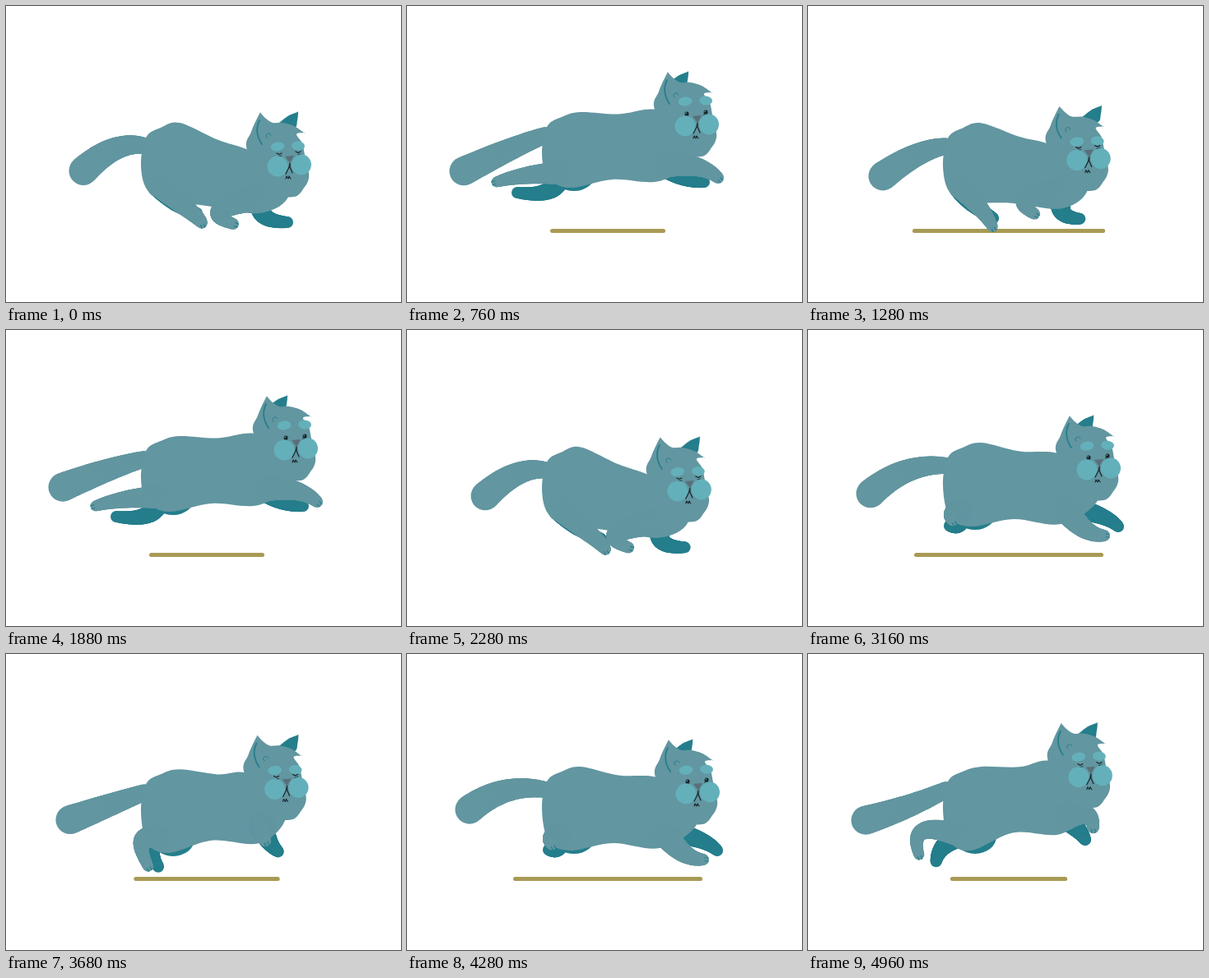
Recreate the animation shown at these times as an HTML page with a canvas. Size 480 by 360 pixels, loop 5 s.

```html
<!DOCTYPE html>
<html lang="en">
<head>
<meta charset="utf-8">
<title>Running cat</title>
<style>
html, body { margin: 0; width: 100%; height: 100%; overflow: hidden; background: #fff; }
canvas { display: block; }
</style>
</head>
<body>
<canvas id="stage" width="480" height="360"></canvas>
<script>
const ctx = document.getElementById('stage').getContext('2d');
const LOOP = 5000, STRIDE = 1120, STEP = 40;
const FUR = '#6296a0', DARK = '#257e8c', PALE = '#64b0ba', SAND = '#a89a55', INK = '#17262c';

// The four key poses of a stride: gathered, lift-off, stretched, landing.
// Tail is bend and end; each leg is knee and toe; belly is its height at haunch, waist and elbow.
const poses = [
  { at: 0, head: [330, 195], turn: [0], hump: [142], belly: [236, 244, 252], tail: [133, 167, 94, 209],
    hind: [236, 258, 238, 264], farHind: [210, 246, 232, 252], fore: [228, 248, 276, 265], farFore: [300, 262, 342, 263], shade: [131] },
  { at: 440, head: [328, 152], turn: [0], hump: [138], belly: [241, 219, 221], tail: [125, 188, 71, 205],
    hind: [122, 200, 142, 248], farHind: [158, 232, 161, 255], fore: [340, 188, 341, 214], farFore: [330, 216, 335, 229], shade: [74] },
  { at: 760, head: [338, 146], turn: [1], hump: [129], belly: [221, 211, 213], tail: [125, 173, 69, 201],
    hind: [140, 204, 109, 214], farHind: [185, 234, 134, 227], fore: [358, 190, 378, 209], farFore: [335, 212, 361, 214], shade: [70] },
  { at: 920, head: [339, 170], turn: [0.8], hump: [137], belly: [239, 230, 236], tail: [118, 161, 76, 199],
    hind: [170, 222, 176, 232], farHind: [187, 242, 172, 238], fore: [335, 250, 360, 250], farFore: [360, 222, 377, 239], shade: [115] }
];

const keyAt = i => {
  const n = poses.length, lap = Math.floor(i / n), pose = poses[i - lap * n];
  return { pose, t: pose.at + lap * STRIDE };
};

// Cubic through the keys, with tangents taken from a parabola of three neighbours.
function poseAt(phase) {
  let i = poses.length - 1;
  while (poses[i].at > phase) i--;
  const k = [i - 1, i, i + 1, i + 2].map(keyAt);
  const [ha, h, hb] = [0, 1, 2].map(j => k[j + 1].t - k[j].t);
  const u = (phase - k[1].t) / h, u2 = u * u, u3 = u2 * u;
  const mix = (a, b, c, d) => {
    const s0 = (b - a) / ha, s1 = (c - b) / h, s2 = (d - c) / hb;
    const m0 = (s0 * h + s1 * ha) / (ha + h), m1 = (s1 * hb + s2 * h) / (h + hb);
    return b + (c - b) * (3 * u2 - 2 * u3) + h * (m0 * (u3 - 2 * u2 + u) + m1 * (u3 - u2));
  };
  const out = {};
  for (const part in poses[0]) {
    if (part === 'at') continue;
    const [a, b, c, d] = k.map(e => e.pose[part]);
    out[part] = b.map((v, j) => mix(a[j], v, c[j], d[j]));
  }
  return out;
}

// Smooth closed shape through x,y pairs.
function blob(p, color) {
  const n = p.length / 2, at = i => [p[(i + n) % n * 2], p[(i + n) % n * 2 + 1]];
  ctx.beginPath();
  ctx.moveTo(p[0], p[1]);
  for (let i = 0; i < n; i++) {
    const [a, b, c, d] = [at(i - 1), at(i), at(i + 1), at(i + 2)];
    ctx.bezierCurveTo(b[0] + (c[0] - a[0]) / 6, b[1] + (c[1] - a[1]) / 6,
      c[0] - (d[0] - b[0]) / 6, c[1] - (d[1] - b[1]) / 6, c[0], c[1]);
  }
  ctx.fillStyle = color;
  ctx.fill();
}

function oval(x, y, rx, ry, color, tilt = 0) {
  ctx.beginPath();
  ctx.ellipse(x, y, rx, ry, tilt, 0, 7);
  ctx.fillStyle = color;
  ctx.fill();
}

function line(p, color, width) {
  ctx.beginPath();
  for (let i = 0; i < p.length; i += 2) ctx.lineTo(p[i], p[i + 1]);
  ctx.strokeStyle = color;
  ctx.lineWidth = width;
  ctx.stroke();
}

// Curved limb whose radius runs from r0 at the joint to r1 at the end.
function limb([x, y], [bx, by, ex, ey], r0, r1, color) {
  for (let i = 0; i <= 60; i++) {
    const t = i / 60, s = 1 - t, r = r0 + (r1 - r0) * t;
    oval(s * s * x + 2 * s * t * bx + t * t * ex, s * s * y + 2 * s * t * by + t * t * ey, r, r, color);
  }
}

function toes([bx, by, ex, ey]) {
  const a = Math.atan2(ey - by, ex - bx), c = Math.cos(a), s = Math.sin(a);
  for (const side of [-2, 2]) {
    line([ex + c * 6 - s * side, ey + s * 6 + c * side, ex + c * 2 - s * side, ey + s * 2 + c * side], DARK, 1.2);
  }
}

function eye(x, y, open) {
  if (open) {
    oval(x, y, 2.5, 2.5, INK);
    oval(x - 0.8, y - 0.8, 0.8, 0.8, PALE);
    line([x - 3, y + 3, x + 2, y + 3], INK, 0.8);
  } else {
    line([x - 3, y - 1, x, y + 0.5, x + 3, y - 1], INK, 1.3);
    line([x - 1, y + 3, x + 3, y + 2], INK, 0.8);
  }
}

// Everything here is measured from the centre of the left cheek.
function head(turn) {
  blob([-37,-20, -32,-42, -22,-64, -20,-64, -14,-58, -6,-53, 6,-53, 20,-49, 32,-41, 32,-41, 23,-39,
    30,-28, 33,-14, 37,3, 38,14, 33,25, 20,37, -10,30], FUR);

  ctx.strokeStyle = DARK;
  ctx.lineWidth = 1.8;
  ctx.beginPath();
  ctx.moveTo(-22, -56);
  ctx.quadraticCurveTo(-29, -42, -19, -27);
  ctx.stroke();
  ctx.lineWidth = 1;
  ctx.beginPath();
  ctx.arc(-11, -37, 3, 2.2, 6);
  ctx.stroke();

  const browY = -24 - 6 * turn, open = turn > 0.5;
  oval(0, browY, 8.5, 5.5, PALE, -0.15);
  oval(25, browY - 1, 8, 5.5, PALE, 0.08);
  eye(2, -15, open);
  eye(25, -17, open);
  oval(0, 0, 12.5, 12.5, PALE);
  oval(29, -2, 12, 12.5, PALE);

  ctx.beginPath();
  ctx.moveTo(9, -12);
  ctx.lineTo(20, -13);
  ctx.lineTo(15, -4);
  ctx.fillStyle = '#596f79';
  ctx.fill();
  line([10, 9, 14, 1, 15, -4, 15, 1, 18, 8], INK, 1.2);
  line([10, 15, 11, 12, 13, 15, 14, 12, 16, 15], INK, 1.1);
}

function draw(t) {
  const phase = t % STRIDE, p = poseAt(phase);
  const [hx, hy] = p.head, [hump] = p.hump, [turn] = p.turn, [half] = p.shade;
  const [haunch, waist, elbow] = p.belly;
  const hip = [185, haunch - 18], shoulder = [312, elbow - 20];

  // The tail swings at half the rate of the stride.
  const sway = -5 * (1 - Math.cos(Math.PI * (t - 840) / STRIDE));
  const tail = p.tail.map((v, i) => v + [0, sway / 2, 0, sway][i]);

  ctx.fillStyle = '#fff';
  ctx.fillRect(0, 0, 480, 360);
  ctx.lineCap = ctx.lineJoin = 'round';
  if (half < 125) line([246.5 - half, 273.5, 241.5 + half, 273.5], SAND, 5);

  const ex = hx + 25 - 21 * turn, ey = hy - 66;
  blob([ex - 27, ey + 19, ex - 14, ey + 6, ex - 1, ey, ex, ey, ex - 1, ey + 10, ex - 5, ey + 20], DARK);
  oval(203, haunch - 17, 26, 21, DARK);
  limb(hip, p.farHind, 14, 7, DARK);
  limb(shoulder, p.farFore, 14, 7, DARK);

  limb([168, hump + 28], tail, 10, 17.5, FUR);
  blob([170, hump + 18, 188, hump + 6, 211, hump, 257, (hump + hy - 20) / 2 + 4, hx - 35, hy - 20, hx + 10, hy,
    hx + 12, hy + 39, 307, elbow, 250, waist, 198, haunch, 172, haunch - 12, 164, hump + 52], FUR);
  limb(hip, p.hind, 14, 6.5, FUR);
  limb(shoulder, p.fore, 16, 7, FUR);
  toes(p.hind);
  toes(p.fore);

  ctx.save();
  ctx.translate(hx, hy);
  head(turn);
  ctx.restore();
}

const start = performance.now();
function tick() {
  const t = (performance.now() - start) % LOOP;
  draw(Math.floor(t / STEP) * STEP);
  requestAnimationFrame(tick);
}
tick();
</script>
</body>
</html>
```
